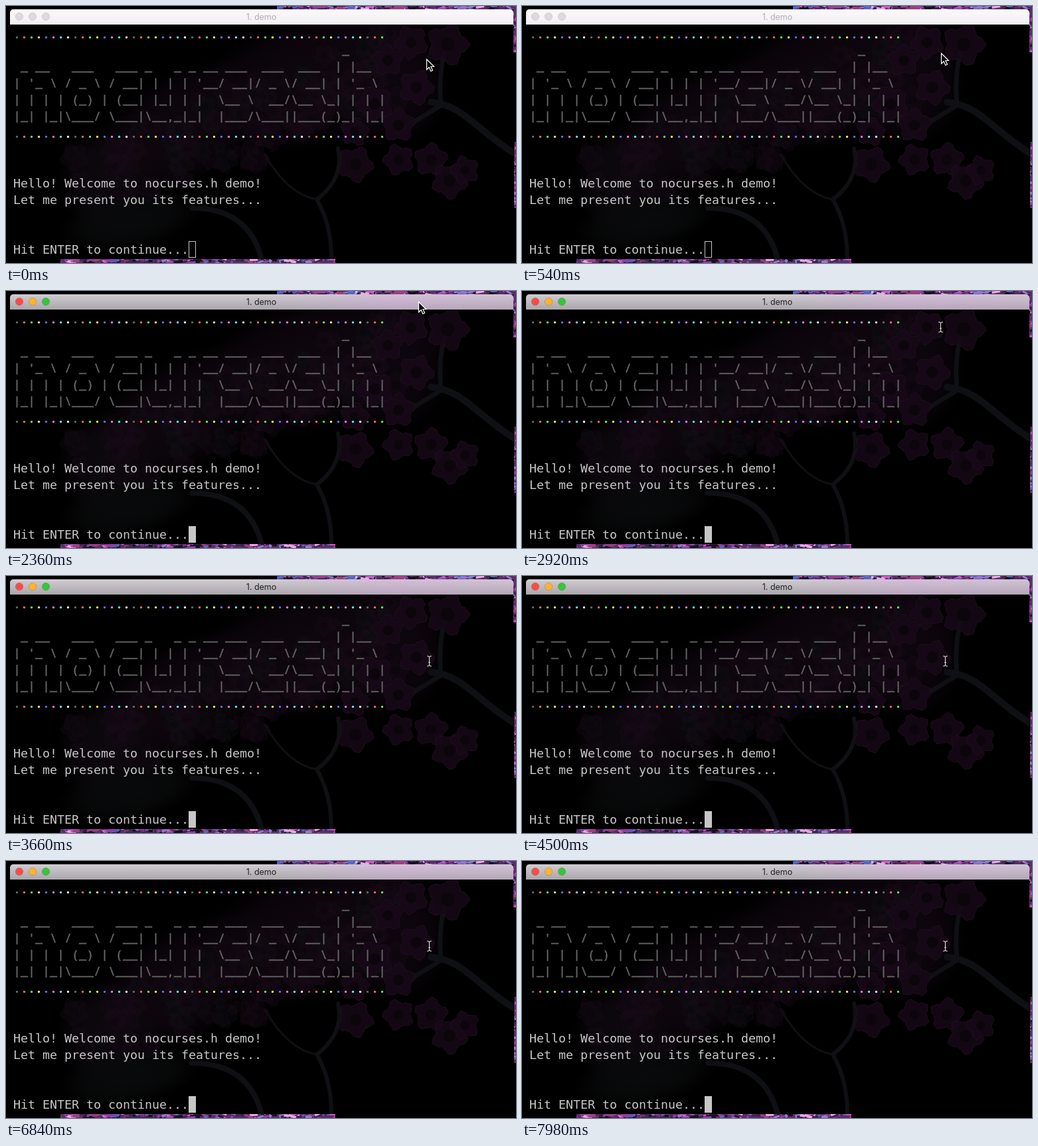
These frames come from a looping animation (768 px wide and 388 px high, 8000 ms). An HTML page with a canvas:

```html
<!DOCTYPE html>
<html lang="en">
<head>
<meta charset="utf-8">
<title>Terminal demo</title>
<style>
html, body { margin: 0; width: 100%; height: 100%; overflow: hidden; background: #000; }
canvas { display: block; }
</style>
</head>
<body>
<canvas id="stage" width="768" height="388"></canvas>
<script>
const WIDTH = 768, HEIGHT = 388, LOOP = 8000, FOCUS_TIME = 2000;
const CELL = 11, LINE = 25, LEFT = 11, FIRST_BASELINE = 49;
const TEXT_FONT = '18.27px "DejaVu Sans Mono", monospace';
const BANNER_FONT = '18.33px "Noto Sans Mono", monospace';
const DOT_FONT = 'bold 18.33px "Noto Sans Mono", monospace';
const DOT_COLORS = ['#686868', '#ff6e67', '#5ffa68', '#fffc67', '#6871ff', '#ff77ff', '#60fdff', '#ffffff'];
const BANNER = [
  String.raw`                                             _`,
  String.raw` _ __   ___   ___ _   _ _ __ ___  ___  ___  | |__`,
  String.raw`| '_ \ / _ \ / __| | | | '__/ __|/ _ \/ __| | '_ \ `,
  String.raw`| | | | (_) | (__| |_| | |  \__ \  __/\__ \_| | | |`,
  String.raw`|_| |_|\___/ \___|\__,_|_|  |___/\___||___(_)_| |_|`
];
// Pointer stops: time, x, y
const PATH = [[0, 633, 80], [300, 633, 80], [1350, 621, 16], [2400, 621, 16], [2920, 630, 54], [3300, 637, 128], [LOOP, 637, 128]];

const stage = document.getElementById('stage').getContext('2d');

function makeRandom(seed) {
  return () => (seed = (seed * 16807) % 2147483647) / 2147483647;
}

function layer(draw) {
  const canvas = document.createElement('canvas');
  canvas.width = WIDTH;
  canvas.height = HEIGHT;
  draw(canvas.getContext('2d'));
  return canvas;
}

function glow(c, x, y, rx, ry, angle, color) {
  c.save();
  c.translate(x, y);
  c.rotate(angle);
  c.scale(rx, ry);
  const g = c.createRadialGradient(0, 0, 0, 0, 0, 1);
  g.addColorStop(0, `rgba(${color},1)`);
  g.addColorStop(0.6, `rgba(${color},.75)`);
  g.addColorStop(1, `rgba(${color},0)`);
  c.fillStyle = g;
  c.fillRect(-1, -1, 2, 2);
  c.restore();
}

function flower(c, x, y, r, turn, fill) {
  c.beginPath();
  for (let i = 0; i <= 50; i++) {
    const a = i / 50 * Math.PI * 2;
    const d = r * (0.84 + 0.13 * Math.cos(5 * a) + 0.03 * Math.cos(17 * a));
    c.lineTo(x + d * Math.cos(a + turn), y + d * Math.sin(a + turn));
  }
  c.fillStyle = fill;
  c.fill();
  c.strokeStyle = '#21121f';
  c.lineWidth = 1;
  c.stroke();
  c.fillStyle = '#0a050b';
  c.beginPath();
  c.arc(x, y, r * 0.3, 0, 7);
  c.fill();
}

function branch(c, width, path) {
  c.lineWidth = width;
  c.strokeStyle = '#0f1013';
  c.stroke(new Path2D(path));
}

function drawWallpaper(c) {
  const random = makeRandom(77);
  c.save();
  c.beginPath();
  c.rect(6, 28, 758, 354);
  c.clip();
  glow(c, 470, 110, 190, 105, -0.25, '15,7,15');
  glow(c, 265, 185, 165, 85, -0.5, '15,7,15');
  glow(c, 150, 260, 75, 80, 0.3, '13,8,14');
  glow(c, 575, 115, 95, 105, 0, '14,6,14');
  glow(c, 185, 325, 110, 45, -0.2, '9,10,11');
  c.lineCap = 'round';
  branch(c, 10, 'M640 145C690 150 705 185 768 224');
  branch(c, 7, 'M665 55Q650 95 655 150L590 190');
  branch(c, 6, 'M500 215Q510 260 468 292Q490 330 490 382');
  branch(c, 8, 'M280 305Q365 305 385 382');
  branch(c, 3, 'M390 225Q425 285 468 292');
  // Ruffled petals along the diagonal cluster
  c.globalAlpha = 0.35;
  for (let i = 0; i < 110; i++) {
    const u = random();
    const x = 125 + u * 445 + (random() - 0.5) * 70;
    const y = 260 - u * 165 + (random() - 0.5) * 115;
    flower(c, x, y, 8 + random() * 16, random() * 6, random() < 0.7 ? '#190b18' : '#0c1114');
  }
  c.globalAlpha = 0.85;
  const blooms = [[665, 58, 34], [610, 55, 27], [575, 82, 25], [618, 123, 28], [555, 148, 29],
    [591, 180, 27], [526, 239, 29], [591, 232, 25], [640, 232, 27], [668, 264, 29], [691, 248, 23], [525, 190, 23]];
  blooms.forEach(([x, y, r], i) => flower(c, x, y, r, i * 1.7, '#180918'));
  c.restore();

  // Bright wallpaper showing around the window
  const colors = ['#d64fc0', '#8c3fa4', '#eda6e6', '#3c2350', '#5068c8', '#171020', '#8f7bd0', '#9c3f80'];
  function fringe(x, y, w, h, count) {
    c.save();
    c.beginPath();
    c.rect(x, y, w, h);
    c.clip();
    c.fillStyle = '#5a2c66';
    c.fillRect(x, y, w, h);
    for (let i = 0; i < count; i++) {
      const px = x + random() * w, py = y + random() * h;
      c.strokeStyle = colors[Math.floor(random() * colors.length)];
      c.lineWidth = 2 + random() * 3;
      c.beginPath();
      c.moveTo(px, py);
      c.lineTo(px + (random() - 0.5) * 30, py + (random() - 0.5) * 8);
      c.stroke();
    }
    c.restore();
  }
  fringe(408, 0, 360, 5, 130);
  fringe(764, 0, 4, 70, 30);
  fringe(765, 205, 3, 100, 30);
  fringe(82, 382, 414, 6, 150);
}

function drawText(c) {
  const baseline = row => FIRST_BASELINE + row * LINE;
  function write(text, row, color, weight) {
    c.fillStyle = c.strokeStyle = color;
    c.lineWidth = weight;
    [...text].forEach((char, i) => {
      c.fillText(char, LEFT + i * CELL, baseline(row));
      if (weight) c.strokeText(char, LEFT + i * CELL, baseline(row));
    });
  }
  c.font = DOT_FONT;
  for (const row of [0, 6]) {
    for (let i = 0; i < 51; i++) {
      c.fillStyle = DOT_COLORS[i % 8];
      c.fillText('.', LEFT + i * CELL, baseline(row));
    }
  }
  // Each banner row keeps a small gap to the next
  c.font = BANNER_FONT;
  BANNER.forEach((text, i) => {
    c.save();
    c.beginPath();
    c.rect(0, baseline(i + 1) - 15, WIDTH, 17);
    c.clip();
    c.translate(0, -1);
    write(text, i + 1, '#666666', 0.4);
    c.restore();
  });
  c.font = TEXT_FONT;
  write('Hello! Welcome to nocurses.h demo!', 9, '#c7c7c7', 0);
  write('Let me present you its features...', 10, '#c7c7c7', 0);
  write('Hit ENTER to continue...', 13, '#c7c7c7', 0);
}

function drawWindow(c, focused) {
  const bar = c.createLinearGradient(0, 5, 0, 28);
  bar.addColorStop(0, focused ? '#d0ccd2' : '#faf8fa');
  bar.addColorStop(1, focused ? '#aaa7ac' : '#f3f0f3');
  c.fillStyle = bar;
  c.beginPath();
  c.roundRect(6, 5, 758, 23, [5, 5, 0, 0]);
  c.fill();
  if (focused) {
    const tint = c.createLinearGradient(400, 0, 764, 0);
    tint.addColorStop(0, 'rgba(215,165,225,0)');
    tint.addColorStop(0.5, 'rgba(215,165,225,.35)');
    tint.addColorStop(1, 'rgba(215,165,225,.2)');
    c.fillStyle = tint;
    c.fill();
  }
  const lights = focused ? ['#fc4b48', '#fdb32f', '#35c63c'] : Array(3).fill('#dcdadc');
  lights.forEach((color, i) => {
    c.fillStyle = color;
    c.beginPath();
    c.arc(20 + i * 20, 16, 5.7, 0, 7);
    c.fill();
    c.strokeStyle = focused ? 'rgba(90,45,0,.3)' : '#c8c6c8';
    c.lineWidth = 0.7;
    c.stroke();
  });
  c.font = '12.5px Inter, sans-serif';
  c.textAlign = 'center';
  c.fillStyle = focused ? '#222222' : '#b0aeb0';
  c.fillText('1. demo', 384.5, 21);
  c.textAlign = 'left';
  if (focused) {
    c.fillStyle = '#c7c7c7';
    c.fillRect(275, 355, 11, 25);
  } else {
    c.strokeStyle = '#c7c7c7';
    c.lineWidth = 1;
    c.strokeRect(275.5, 355.5, 10, 24);
  }
}

function pointerAt(t) {
  const i = PATH.findIndex(stop => stop[0] > t);
  const [t0, x0, y0] = PATH[i - 1], [t1, x1, y1] = PATH[i];
  const p = (t - t0) / (t1 - t0);
  const e = p * p * (3 - 2 * p);
  return [x0 + (x1 - x0) * e, y0 + (y1 - y0) * e];
}

const ARROW = new Path2D('M0 0V15.5L3.6 12L6.3 18L9 16.8L6.4 11H11Z');
const BEAM = new Path2D('M-3.5 -7.5H-1.5L0 -6L1.5 -7.5H3.5M0 -6V6M-3.5 7.5H-1.5L0 6L1.5 7.5H3.5M-1.5 2H1.5');

function drawPointer(c, t) {
  const [x, y] = pointerAt(t);
  c.save();
  c.translate(Math.round(x) + 0.5, Math.round(y) + 0.5);
  c.lineWidth = 1.2;
  if (t >= FOCUS_TIME && y > 28) {
    c.strokeStyle = '#d5d5c8';
    c.stroke(BEAM);
  } else {
    c.fillStyle = '#080808';
    c.fill(ARROW);
    c.strokeStyle = '#ffffff';
    c.stroke(ARROW);
  }
  c.restore();
}

const scenes = [false, true].map(focused => layer(c => {
  c.fillStyle = '#000';
  c.fillRect(0, 0, WIDTH, HEIGHT);
  drawWallpaper(c);
  drawText(c);
  drawWindow(c, focused);
}));

function render(now) {
  const t = now % LOOP;
  stage.drawImage(scenes[t < FOCUS_TIME ? 0 : 1], 0, 0);
  drawPointer(stage, t);
  requestAnimationFrame(render);
}
requestAnimationFrame(render);
</script>
</body>
</html>
```
